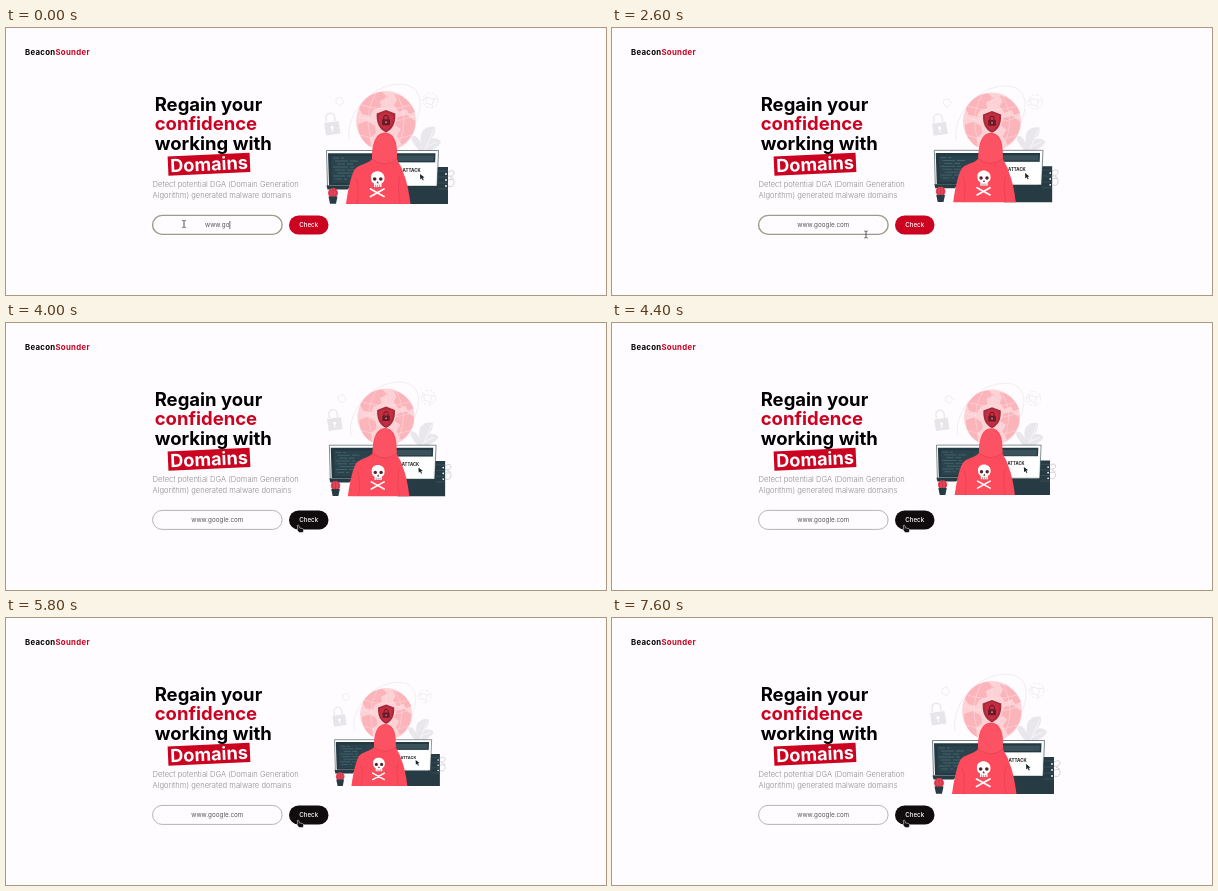
Animation of 600x267 px, one loop 8000 ms. Source, as an HTML page:

```html
<!DOCTYPE html>
<html lang="en">
<head>
<meta charset="utf-8">
<title>BeaconSounder</title>
<style>
  html, body { margin: 0; width: 100%; height: 100%; overflow: hidden; background: #fffcff; }
  svg { display: block; width: 100vw; height: 100vh; font-family: Inter, "Open Sans", sans-serif; }
  .bold { font-weight: 700; }
  .red { fill: #cb0320; }
  .mid { text-anchor: middle; }
  .faint { fill: none; stroke: #ebe8ec; stroke-width: .8; }
</style>
</head>
<body>
<svg viewBox="0 0 600 267">
  <text class="bold" x="19" y="27" font-size="7.8" letter-spacing=".3">Beacon<tspan class="red">Sounder</tspan></text>

  <g class="bold" font-size="18.5">
    <text x="148.7" y="82.8">Regain your</text>
    <text class="red" x="148.7" y="102.2">confidence</text>
    <text x="148.7" y="121.6">working with</text>
    <g transform="translate(203 136.200) rotate(-2.6)">
      <rect class="red" x="-41" y="-9.6" width="82" height="19.2"/>
      <text class="mid" y="6.4" font-size="18.2" fill="#fff">Domains</text>
    </g>
  </g>

  <g font-size="7.6" font-weight="300" fill="#8f8d90">
    <text x="146.6" y="159.3">Detect potential DGA (Domain Generation</text>
    <text x="146.6" y="170">Algorithm) generated malware domains</text>
  </g>

  <rect id="field" x="146.600" y="187.400" width="129.500" height="19" rx="9.5" fill="#fffcff"/>
  <text id="typed" class="mid" x="211.3" y="199.2" font-size="6.3" fill="#555"></text>
  <path id="caret" stroke="#333" stroke-width=".7"/>
  <rect id="button" x="283" y="187.4" width="39.5" height="19.2" rx="9.6"/>
  <text class="mid" x="302.7" y="199.2" font-size="6.2" font-weight="500" fill="#fff">Check</text>

  <g id="art">
    <!-- orbits and background icons -->
    <g class="faint">
      <path d="M343 112C340 88 360 62 386 57C403 54 412 60 414 72C415 82 411 92 407 99"/>
      <path d="M330 71l5-2 3 5-4 4-4-3z"/>
      <circle cx="424.500" cy="72.500" r="7.500" stroke-dasharray="3 1.500"/>
      <path d="M420 69l8 2-2 6-6-2zM417 73l3-4M432 70l-4 1M426 77l1 3"/>
      <path d="M320.500 94l-.5-4a4.300 4.300 0 0 1 8.600-1l.6 4" stroke-width="1.500"/>
    </g>
    <path d="M318 95l14.500-2 2 12.500-14.500 2z" fill="#e7e5e9"/>
    <circle cx="326" cy="99.500" r="1.500" fill="#fff"/>
    <path d="M326 100l.6 4" stroke="#fff"/>
    <path d="M414 124C409 117 404 112 406 108C410 107 413 111 415 115C414 108 415 103 419 101C420 99 425 98 429 99C430 105 427 109 424 111C430 109 434 112 435 114C432 120 426 121 424 124z" fill="#e9e7eb"/>
    <path d="M418 124L428 101M420 119l11-5" stroke="#fff" stroke-width=".6" fill="none"/>

    <!-- globe -->
    <circle cx="380" cy="93" r="30" fill="#fdd2d6"/>
    <g fill="#fab4ba">
      <path d="M353 80C359 68 369 64 376 64L382 69 374 73 375 79 367 82 364 88 356 86z"/>
      <path d="M352 96l9-3 8 5 1 7-6 5 1 9C357 115 352 106 352 96z"/>
      <path d="M388 66C397 67 405 74 409 84L403 86 400 81 393 84 388 77 391 72z"/>
      <path d="M392 89l9-2 8 6C410 103 404 112 396 117L391 108 395 101 389 97z"/>
    </g>
    <path d="M351 88Q380 99 409 88M355 77Q380 85 405 77M354 107Q380 116 406 107M380 63V123M370 65Q354 92 370 121M390 65Q406 92 390 121" fill="none" stroke="#fee3e6" stroke-width=".5"/>
    <path d="M380 82l9.300 3.500C389.800 95 387 101 380 104.500C373 101 370.200 95 370.700 85.500z" fill="#a32b3b"/>
    <path d="M380 84l7.300 2.700C387.600 94.500 385 99.500 380 102.300C375 99.500 372.400 94.500 372.700 86.700z" fill="#c72d40"/>
    <path d="M377.700 91.500v-2a2.300 2.300 0 0 1 4.600 0v2" fill="none" stroke="#5d1924"/>
    <rect x="376" y="91.200" width="8" height="6" rx=".8" fill="#641d28"/>
    <circle cx="380" cy="94.200" r=".9" fill="#f27d88"/>

    <!-- monitor and desk -->
    <path d="M428 139h14v37h-50v-18h36z" fill="#263b44"/>
    <path d="M432 143h10M432 149h10M432 155h10M432 161h10" stroke="#42565f" stroke-width=".7"/>
    <g fill="#fff"><circle cx="440" cy="146" r=".9"/><circle cx="440" cy="152" r=".9"/><circle cx="440" cy="158" r=".9"/></g>
    <path d="M442 144q6-3 6 1t-6 3M442 152q7-2 6 3t-6 3M444 149l4 2" fill="none" stroke="#c7c7cb" stroke-width=".8"/>
    <path d="M320.500 122.500H432.500L431 158H321.500z" fill="#fff" stroke="#233740" stroke-width=".6"/>
    <path d="M322 125.200h107.500l-1.300 32H323z" fill="#243a43"/>
    <path d="M325 128h62v27h-61z" fill="#2b434c"/>
    <path d="M388 127.500h40l-.4 5.500H388z" fill="#3c525b"/>
    <g id="codeLines" stroke="#4f737b" stroke-width=".7"></g>
    <path d="M390 134.500h41l-1 23H390z" fill="#fff" stroke="#dfe0e2" stroke-width=".4"/>
    <text class="bold" x="396.500" y="144.300" font-size="4.500" fill="#222">ATTACK</text>
    <path d="M414 146l4.600 3.500-2 .2 1.200 2.300-1 .4-1.100-2.200-1.400 1.300z" fill="#17232a"/>
    <path d="M320.500 157.500h25l-4 4h-20z" fill="#263b44"/>

    <!-- cactus -->
    <circle cx="327" cy="165" r="5" fill="#e74658"/>
    <path d="M324.500 161q-2 4 0 8M327 160v10M329.500 161q2 4 0 8" fill="none" stroke="#a72e40" stroke-width=".6"/>
    <path d="M322.500 168.500h9l-1.500 7.300h-6z" fill="#263b44"/>

    <!-- hooded figure -->
    <path d="M340 176C342 161 345 147 349 141C354 136 362 136 366 131C366 116 369 105 379 104.500C389 105 392 116 391 131C393 136 396 139 397 144C401 153 403 164 404.500 176z" fill="#fc4b5c"/>
    <path d="M366 131C366 117 370 106 379 105.500C387 106 391 118 391 131C384 137 374 137 366 131z" fill="#fb5363"/>
    <path d="M366 131Q379 141 391 131M350 150Q354 159 351 176M394 148Q391 158 394 176" fill="none" stroke="#e03e51" stroke-width=".6"/>
    <g stroke="#fff" stroke-width="1.700" stroke-linecap="round">
      <path d="M364.500 161l13.500 7.500M378 161l-13.500 7.500"/>
    </g>
    <path d="M365 150C364 141 378.500 141 378.500 150C378.500 153.500 377 154.500 375.500 155.500V159H368V155.500C366.500 154.500 365 153.500 365 150z" fill="#fff"/>
    <g fill="#53232b"><circle cx="368.700" cy="151" r="1.800"/><circle cx="374.800" cy="151" r="1.800"/><path d="M371.700 153l1.100 2.200h-2.200z"/></g>
    <path d="M369.700 156.700v2.300M371.700 156.700v2.300M373.700 156.700v2.300" stroke="#53232b" stroke-width=".5"/>
  </g>

  <g id="pointer">
    <path id="beam" d="M-1.700-3.500Q0-3.500 0-2.700Q0-3.500 1.700-3.500M0-2.700V2.700M-1.700 3.500Q0 3.500 0 2.700Q0 3.500 1.700 3.500" fill="none" stroke="#333" stroke-width=".8"/>
    <path id="hand" d="M-2.200-3.500q1-.9 1.600.2l.7 2.200 3.200.8q1 .4.800 1.500l-.5 2.400H-.4L-2.600.7q-.3-1 .9-.7z" fill="#111" stroke="#fff" stroke-width=".5"/>
  </g>
</svg>
<script>
const LOOP = 8000, STEP = 200;
const $ = id => document.getElementById(id);

const typing = [[0, "www.go"], [200, "www.goo"], [400, "www.goog"], [800, "www.googl"],
  [1000, "www.google"], [1600, "www.google."], [1800, "www.google.co"], [2000, "www.google.com"]];
const zoom = [[2200, 1], [2600, .97], [3600, .967], [4000, .953], [4600, .925], [5000, .902],
  [5800, .867], [6600, .938], [7000, .995], [7200, 1]];
const pointerX = [[2200, 178], [2400, 207], [2600, 254], [2800, 281], [3000, 293.5]];
const pointerY = [[2200, 196], [2400, 201], [2600, 206.5], [2800, 207], [3000, 206]];

function lerpKeys(keys, t) {
  const next = keys.findIndex(([time]) => time > t);
  if (next === 0) return keys[0][1];
  if (next < 0) return keys.at(-1)[1];
  const [t0, a] = keys[next - 1], [t1, b] = keys[next];
  return a + (b - a) * (t - t0) / (t1 - t0);
}

const between = (t, from, to) => t >= from && t < to;
const show = (id, on) => $(id).setAttribute("visibility", on ? "visible" : "hidden");

// Indented rows of code on the monitor
let rows = "";
for (let i = 0; i < 8; i++) {
  const x = 327 + i % 3 * 2;
  rows += `M${x} ${130 + i * 3}h${6 + i * 7 % 12}m2 0h${3 + i * 5 % 7}`;
}
$("codeLines").innerHTML = `<path d="${rows}"/>`;

function draw(now) {
  const t = Math.floor(now % LOOP / STEP) * STEP;
  const hover = t >= 2800, focused = t < 3200;

  $("typed").textContent = typing.findLast(([time]) => time <= t)[1];
  const caretX = 211.6 + $("typed").getComputedTextLength() / 2;
  $("caret").setAttribute("d", `M${caretX} 193v8`);
  show("caret", t < 2400 && !between(t, 1200, 1600));

  $("field").setAttribute("stroke", focused ? "#9a9d88" : "#a3a1a5");
  $("field").setAttribute("stroke-width", focused ? 1.4 : .8);
  $("button").setAttribute("fill", hover ? "#100c0e" : "#cb0320");

  const s = lerpKeys(zoom, t);
  $("art").setAttribute("transform", `translate(381 116.5) scale(${s}) translate(-381 -116.5)`);

  $("pointer").setAttribute("transform", `translate(${lerpKeys(pointerX, t)} ${lerpKeys(pointerY, t)})`);
  show("beam", !hover);
  show("hand", hover);
  requestAnimationFrame(frame);
}

const start = performance.now();
function frame() { draw(performance.now() - start); }
frame();
</script>
</body>
</html>
```
